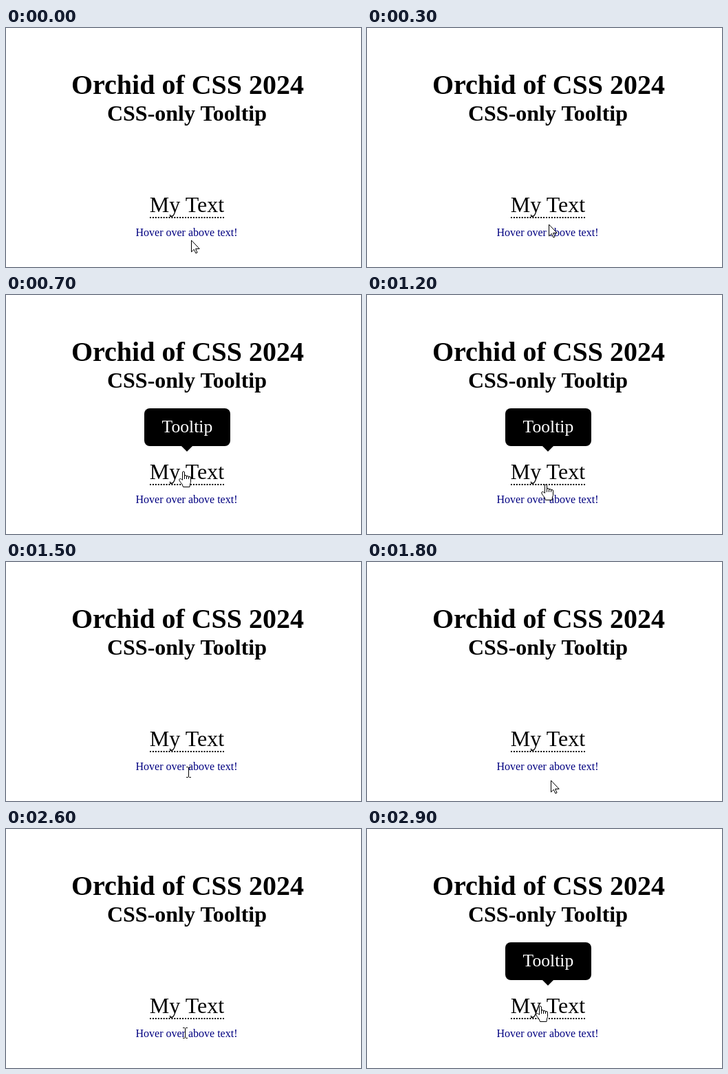
Recreate the animation shown at these times as an HTML page. Size 516 by 348 pixels, loop 3 s.

```html
<!DOCTYPE html>
<html lang="en">
<meta charset="utf-8">
<title>CSS-only Tooltip</title>
<style>
  html, body { margin: 0; width: 100%; height: 100%; overflow: hidden; background: #fff; }
  svg { display: block; }
  text { font-family: "Liberation Serif", "Times New Roman", serif; text-anchor: middle; }
  .bold { font-weight: bold; }
  .cursor { fill: #fff; stroke: #000; stroke-linejoin: round; stroke-linecap: round; }
</style>
<svg width="516" height="348" viewBox="0 0 516 348">
  <text class="bold" x="264" y="96" font-size="40">Orchid of CSS 2024</text>
  <text class="bold" x="263" y="135" font-size="32">CSS-only Tooltip</text>
  <g id="tooltip">
    <rect x="201" y="165" width="125" height="55" rx="8"/>
    <path d="M254 219h18l-9 9z"/>
    <text x="263.4" y="200" font-size="25.6" fill="#fff">Tooltip</text>
  </g>
  <text x="263" y="268" font-size="32">My Text</text>
  <!-- 28 dots, one at each end -->
  <path d="M209 276H317" stroke="#000" stroke-width="2" pathLength="55" stroke-dasharray="1"/>
  <text x="262.5" y="303" font-size="16" fill="navy">Hover over above text!</text>

  <path id="arrow" class="cursor" d="M.5.5V17l3.8-3.6 2.6 5.6 2.2-1-2.5-5.5h5.2z"/>
  <path id="hand" class="cursor" d="M-1.5 13V2a1.6 1.6 0 0 1 3 0V12 8a1.5 1.5 0 0 1 3 0V12 9a1.5 1.5 0 0 1 3 0V12 10a1.5 1.5 0 0 1 3 0V16.5Q9 20 9 23.5H-.5Q-1 20-4.5 16.5L-6 14C-7 12-5 10.5-3 12.2z"/>
  <path id="beam" class="cursor" fill-opacity="0" d="M-2.5-7.5h2l1 1 1-1h2M.5-6.5v13M-2.5 7.5h2l1-1 1 1h2"/>
</svg>
<script>
  const LOOP = 3000, STEP = 100;
  // The pointer eases between these rests: time, x, y
  const rests = [
    [-250, 271, 318], [850, 257, 253], [1750, 267, 318], [2400, 264, 318], [2900, 252, 257]
  ];
  const byId = id => document.getElementById(id);
  const cursors = ["arrow", "hand", "beam"].map(byId);
  const tooltip = byId("tooltip");
  const show = (el, on) => el.setAttribute("visibility", on ? "visible" : "hidden");
  const ease = k => k * k * (3 - 2 * k);

  function pointerAt(t) {
    const i = rests.findIndex(([time]) => time >= t);
    const [t0, ...from] = rests[i - 1], [t1, ...to] = rests[i];
    const k = ease((t - t0) / (t1 - t0));
    return from.map((v, axis) => Math.round(v + (to[axis] - v) * k));
  }

  function draw(now) {
    const [x, y] = pointerAt(Math.floor(now % LOOP / STEP) * STEP);
    const hovering = y < 278;
    const kind = hovering ? "hand" : y > 288 && y < 308 ? "beam" : "arrow";
    for (const cursor of cursors) {
      show(cursor, cursor.id === kind);
      cursor.setAttribute("transform", `translate(${x} ${y})`);
    }
    show(tooltip, hovering);
  }

  const start = performance.now();
  function tick() {
    draw(performance.now() - start);
    requestAnimationFrame(tick);
  }
  tick();
</script>
</html>
```
